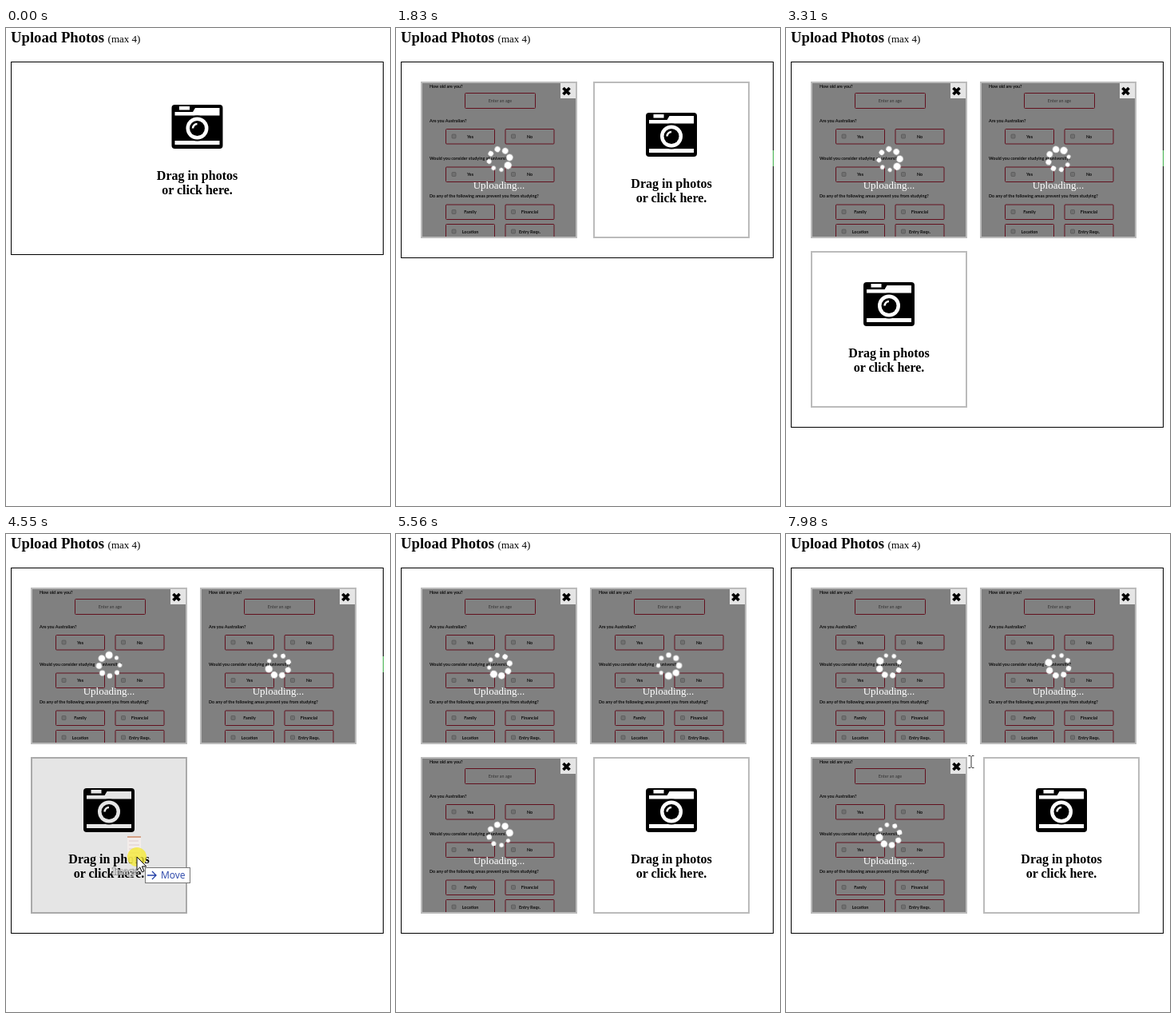
Animation of 481 by 598 pixels, one loop 8 s. Source, as an HTML page:

```html
<!DOCTYPE html>
<html lang="en">
<head>
<meta charset="utf-8">
<title>Upload Photos</title>
<style>
html, body { margin: 0; width: 100%; height: 100%; overflow: hidden; background: #fff; }
svg { display: block; }
text { font-family: "Liberation Serif", "Times New Roman", serif; }
.title { font-size: 18.72px; font-weight: 700; }
.title tspan { font-size: 13px; font-weight: 400; }
.prompt text { font-size: 16px; font-weight: 700; text-anchor: middle; }
.form text { font: 700 5.4px Lato, sans-serif; fill: #0c0c0c; }
.form .mid { text-anchor: middle; }
.form .hint { font-weight: 400; fill: #333; }
.field { fill: none; stroke: #62101e; }
.status { font-size: 13px; fill: #fff; text-anchor: middle; }
.tip text { font: 12px "Open Sans", sans-serif; fill: #2743a8; }

/* One shared 8 s clock: jumps use step-end, movement is linear. */
.step { animation: 8s step-end infinite; }
.move { animation: 8s linear infinite; }

.frame { color: #fff; animation-name: frame; }
.frame rect { height: 241px; animation-name: grow; }
.zone { animation-name: zone; }
.slot { animation-name: slot; }
.p1 { animation-name: p1; }
.p2 { animation-name: p2; }
.p3 { animation-name: p3; }
.p4 { animation-name: p4; }
.s1 { animation-name: s1; }
.s2 { animation-name: s2; }
.s3 { animation-name: s3; }
.s4 { animation-name: s4; }
.edge { animation-name: edge; }
.cursor { animation-name: path; }
.drag { animation-name: drag; }
.arrow { animation-name: arrow; }
.hand { animation-name: hand; }
.beam { animation-name: beam; }

@keyframes frame { 0%, 18.75% { color: #fff } 15% { color: #e5e5e5 } }
@keyframes grow {
  0% { height: 241px } 18.75% { height: 245px } 36.875%, 100% { height: 457px }
}
@keyframes zone { 0% { visibility: visible } 18.75%, 100% { visibility: hidden } }
@keyframes slot {
  0% { visibility: hidden; transform: translate(247px, 67px); color: #fff; stroke: #bbb }
  18.75% { visibility: visible; transform: translate(247px, 67px); color: #fff; stroke: #bbb }
  24.8% { visibility: visible; transform: translate(247px, 67px); color: #e5e5e5; stroke: #aaa }
  36.875% { visibility: visible; transform: translate(31px, 279px); color: #fff; stroke: #bbb }
  52% { visibility: visible; transform: translate(31px, 279px); color: #e5e5e5; stroke: #aaa }
  58.125% { visibility: visible; transform: translate(247px, 279px); color: #fff; stroke: #bbb }
  78.6% { visibility: visible; transform: translate(247px, 279px); color: #e5e5e5; stroke: #aaa }
  83.125% { visibility: hidden; transform: translate(247px, 279px); color: #fff; stroke: #bbb }
  94.375%, 100% { visibility: visible; transform: translate(247px, 279px); color: #fff; stroke: #bbb }
}
@keyframes p1 { 0% { visibility: hidden } 18.75%, 100% { visibility: visible } }
@keyframes p2 { 0% { visibility: hidden } 36.875%, 100% { visibility: visible } }
@keyframes p3 { 0% { visibility: hidden } 58.125%, 100% { visibility: visible } }
@keyframes p4 { 0%, 94.375%, 100% { visibility: hidden } 83.125% { visibility: visible } }
@keyframes s1 {
  0%, 18.75% { transform: rotate(-25deg) } 22.875% { transform: rotate(34deg) }
  41.375% { transform: rotate(402deg) } 56.875% { transform: rotate(628deg) }
  69.5% { transform: rotate(843deg) } 85.875% { transform: rotate(1091deg) }
  99.75% { transform: rotate(1286deg) } 100% { transform: rotate(1290deg) }
}
@keyframes s2 {
  0%, 36.875% { transform: rotate(-125deg) } 41.375% { transform: rotate(-60deg) }
  56.875% { transform: rotate(160deg) } 69.5% { transform: rotate(450deg) }
  85.875% { transform: rotate(727deg) } 99.75% { transform: rotate(916deg) }
  100% { transform: rotate(920deg) }
}
@keyframes s3 {
  0%, 58.125% { transform: rotate(-176deg) } 69.5% { transform: rotate(-12deg) }
  85.875% { transform: rotate(330deg) } 99.75% { transform: rotate(526deg) }
  100% { transform: rotate(530deg) }
}
@keyframes s4 {
  0%, 83.125% { transform: rotate(185deg) } 85.875% { transform: rotate(225deg) }
  94.375%, 100% { transform: rotate(347deg) }
}
@keyframes edge { 0%, 65%, 100% { visibility: hidden } 22.25% { visibility: visible } }
@keyframes path {
  0%, 13.875% { transform: translate(560px, 190px) }
  14.75% { transform: translate(440px, 170px) }
  17.5% { transform: translate(250px, 170px) }
  18.75% { transform: translate(240px, 170px) }
  22.25% { transform: translate(500px, 165px) }
  24.25% { transform: translate(560px, 165px) }
  24.75% { transform: translate(400px, 165px) }
  30.6% { transform: translate(345px, 190px) }
  36.875% { transform: translate(340px, 190px) }
  40.6% { transform: translate(520px, 165px) }
  45.4% { transform: translate(540px, 220px) }
  46.125% { transform: translate(390px, 250px) }
  52.5% { transform: translate(200px, 390px) }
  55.875%, 58.125% { transform: translate(164px, 404px) }
  65% { transform: translate(420px, 516px) }
  66.4% { transform: translate(520px, 516px) }
  77.9% { transform: translate(540px, 330px) }
  78.75% { transform: translate(410px, 350px) }
  82.5% { transform: translate(366px, 445px) }
  83.125% { transform: translate(366px, 449px) }
  85.875%, 87.8% { transform: translate(366px, 459px) }
  88.75% { transform: translate(370px, 448px) }
  92.5%, 95% { transform: translate(423px, 291px) }
  98.5% { transform: translate(240px, 286px) }
  99.75%, 100% { transform: translate(232px, 285px) }
}
@keyframes drag {
  0%, 24%, 44%, 72% { visibility: visible }
  18.75%, 36.875%, 58.125%, 83.125%, 100% { visibility: hidden }
}
@keyframes arrow { 0% { visibility: visible } 83.125%, 100% { visibility: hidden } }
@keyframes hand { 0%, 98.5%, 100% { visibility: hidden } 83.125% { visibility: visible } }
@keyframes beam { 0% { visibility: hidden } 98.5%, 100% { visibility: visible } }
</style>
</head>
<body>
<svg width="481" height="598" viewBox="0 0 481 598">
  <defs>
    <g id="prompt" class="prompt" stroke="none">
      <rect x="-32" width="64" height="55" rx="4"/>
      <g fill="currentColor">
        <path d="M-22.500 2h13v4.500h-13zM-28 9h22.500l3-5H28v9.500h-56zM-28 45h56v5h-56z"/>
        <circle cy="29.500" r="16" fill="#000"/>
        <circle cy="29.500" r="14"/>
      </g>
      <circle cy="29.500" r="9.500"/>
      <path d="M-5.500 29.500a5.500 5.500 0 0 1 5.500-5.500" fill="none" stroke="currentColor" stroke-width="2.500"/>
      <text y="94">Drag in photos</text>
      <text y="112">or click here.</text>
    </g>

    <g id="pair">
      <rect class="field" x="31.500" y=".5" width="61" height="18.500" rx="1"/>
      <rect x="39" y="7" width="5" height="5" rx="1" fill="#707070" stroke="#555" stroke-width=".7"/>
    </g>
    <g id="row">
      <use href="#pair"/>
      <use href="#pair" x="74.500"/>
    </g>
    <clipPath id="inner"><rect x="2" y="2" width="192" height="192"/></clipPath>

    <g id="photo">
      <rect x="1" y="1" width="194" height="194" fill="#808080" stroke="#bbb" stroke-width="2"/>
      <g class="form" clip-path="url(#inner)">
        <text x="11" y="8">How old are you?</text>
        <rect class="field" x="55.500" y="14.500" width="88" height="19" rx="1"/>
        <text class="mid hint" x="99.500" y="26">Enter an age</text>
        <text x="11" y="50.500">Are you Australian?</text>
        <use href="#row" y="59"/>
        <text class="mid" x="62" y="70.500">Yes</text>
        <text class="mid" x="136.500" y="70.500">No</text>
        <text x="11" y="97.500">Would you consider studying at university?</text>
        <use href="#row" y="106.500"/>
        <text class="mid" x="62" y="118">Yes</text>
        <text class="mid" x="136.500" y="118">No</text>
        <text x="11" y="145">Do any of the following areas prevent you from studying?</text>
        <use href="#row" y="153.500"/>
        <text class="mid" x="62" y="165">Family</text>
        <text class="mid" x="136.500" y="165">Financial</text>
        <use href="#row" y="178"/>
        <text class="mid" x="62" y="189.500">Location</text>
        <text class="mid" x="136.500" y="189.500">Entry Reqs.</text>
      </g>
      <rect x="175" y="2" width="19" height="19" fill="#e5e5e5"/>
      <path d="M178.500 8l8 8m0-8l-8 8" stroke="#000" stroke-width="3.800"/>
      <text class="status" x="98" y="134">Uploading...</text>
    </g>

    <!-- Dots shrink counterclockwise behind the leading one. -->
    <g id="spinner" fill="#fff">
      <circle cx="13" r="4.600"/>
      <circle cx="9.200" cy="-9.200" r="4.200"/>
      <circle cy="-13" r="3.800"/>
      <circle cx="-9.200" cy="-9.200" r="3.500"/>
      <circle cx="-13" r="3.200"/>
      <circle cx="-9.200" cy="9.200" r="2.900"/>
      <circle cy="13" r="2.700"/>
      <circle cx="9.200" cy="9.200" r="2.500"/>
    </g>
  </defs>

  <text class="title" x="6" y="18">Upload Photos <tspan>(max 4)</tspan></text>

  <g class="frame step">
    <rect class="step" x="6.500" y="42.500" width="466" fill="currentColor" stroke="#000"/>
    <g class="zone step"><use href="#prompt" x="239.500" y="96"/></g>
  </g>
  <rect class="edge step" x="472" y="153" width="1" height="20" fill="#3fae49"/>

  <g class="slot step">
    <rect x="1" y="1" width="194" height="194" fill="currentColor" stroke-width="2"/>
    <use href="#prompt" x="98" y="39"/>
  </g>

  <g class="p1 step" transform="translate(31 67)">
    <use href="#photo"/>
    <g transform="translate(98.500 97.500)"><use class="s1 move" href="#spinner"/></g>
  </g>
  <g class="p2 step" transform="translate(243 67)">
    <use href="#photo"/>
    <g transform="translate(98.500 97.500)"><use class="s2 move" href="#spinner"/></g>
  </g>
  <g class="p3 step" transform="translate(31 279)">
    <use href="#photo"/>
    <g transform="translate(98.500 97.500)"><use class="s3 move" href="#spinner"/></g>
  </g>
  <g class="p4 step" transform="translate(243 279)">
    <use href="#photo"/>
    <g transform="translate(98.500 97.500)"><use class="s4 move" href="#spinner"/></g>
  </g>

  <g class="cursor move">
    <g class="drag step">
      <g opacity=".75">
        <rect x="-12" y="-26" width="17" height="33" fill="#f7efec"/>
        <path d="M-12-25h17" stroke="#cf8a66" stroke-width="2"/>
        <path d="M-10-20h12m-12 5h13m-13 5h11m-11 5h13m-13 5h12" stroke="#d9c3c3"/>
      </g>
      <text x="-31" y="22" font-size="13" fill="#fff" stroke="#777" stroke-width="1.500" paint-order="stroke" opacity=".8">Image</text>
      <circle r="12" fill="#f5ea2c" opacity=".75"/>
      <g class="tip">
        <rect x="10.500" y="13.500" width="56" height="19" fill="#fff" stroke="#767676"/>
        <path d="M13 23h11m-5-5l5 5-5 5" fill="none" stroke="#2743a8" stroke-width="1.300"/>
        <text x="30" y="27">Move</text>
      </g>
    </g>
    <path class="arrow step" d="M0 0v16.500l3.800-3.600 2.600 6 2.600-1.100-2.600-5.900h5.300z" fill="#fff" stroke="#000"/>
    <g class="hand step" stroke="#222" stroke-linejoin="round">
      <path d="M-2 1.500a2 2 0 0 1 4 0v7.500l6 1.500q3 .8 2.800 3.500-.2 4-1.800 6.500v2h-8.500q-1-3.500-3-5.500l-3-4.500q-.5-2.500 1.500-1.800l2 2z" fill="#fff"/>
      <path d="M2 9v4m3-3v3m3-2.500v3" fill="none"/>
    </g>
    <path class="beam step" d="M-3.500-7.500h2.500l1 1 1-1h2.500M0-6.500v13M-3.500 7.500h2.500l1-1 1 1h2.500" fill="none" stroke="#333"/>
  </g>
</svg>
</body>
</html>
```
